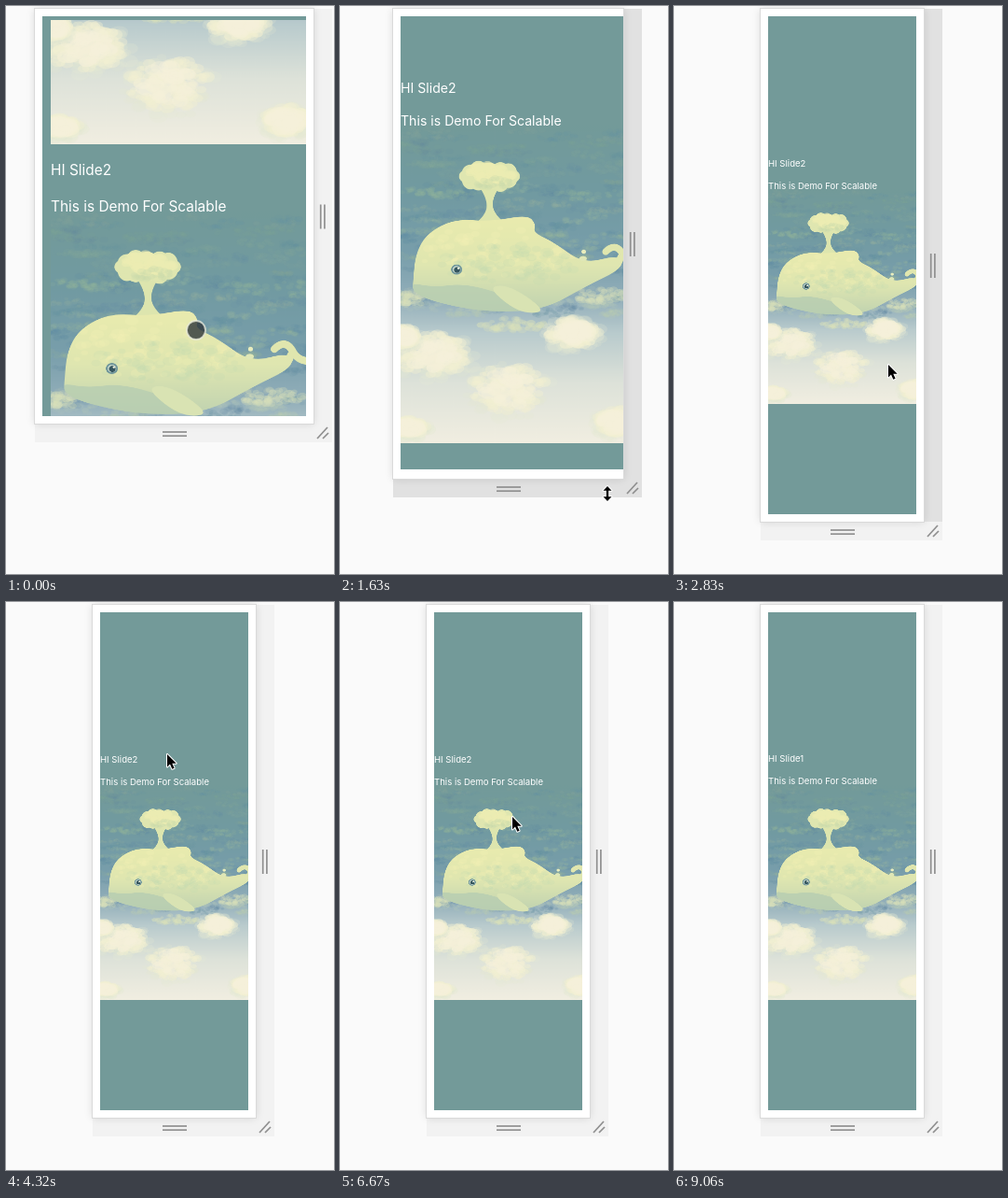
Write an HTML page with a canvas that moves like this. It is 352 px wide and 608 px high and loops after 9.81 s.

```html
<!DOCTYPE html>
<html lang="en">
<head>
<meta charset="utf-8">
<title>Scalable slides</title>
<style>
html, body { margin: 0; width: 100%; height: 100%; overflow: hidden; background: #fafafa; }
canvas { display: block; width: 352px; height: 608px; }
</style>
</head>
<body>
<canvas id="stage" width="352" height="608"></canvas>
<script>
const LOOP = 9810, TEAL = '#739a99', SLIDE_W = 173, SLIDE_H = 277;
const ctx = document.getElementById('stage').getContext('2d');

// The picture only changes in bursts: start, end, number of steps.
const bursts = [
  [140, 1040, 7], [1330, 2230, 7], [2380, 3120, 6], [3420, 4320, 7],
  [4620, 5640, 8], [5790, 6670, 7], [7420, 7870, 4], [8470, 9060, 5]
];
const ticks = [0];
for (const [from, to, n] of bursts)
  for (let i = 0; i < n; i++) ticks.push(Math.floor((from + (to - from) * i / (n - 1)) / 10) * 10);

const ramp = (t, from, to) => Math.min(1, Math.max(0, (t - from) / (to - from)));

// Moves are [from, to, change].
const total = (value, moves, t) => moves.reduce((v, [from, to, d]) => v + d * ramp(t, from, to), value);

const rightAt = t => total(330, [[1180, 1630, -26], [2230, 2670, -36]], t);
const bottomAt = t => total(447, [[1180, 1630, 59], [1630, 2230, 46]], t);

// Share of the slide height by which slide 2 is pulled down.
const pullAt = t => total(.3, [
  [0, 590, -.3], [3270, 3870, .3], [3870, 4170, -.3], [4470, 5200, .28],
  [5200, 5500, .72], [6080, 6520, -1], [7270, 7870, .42], [8320, 8910, .58]
], t);

// Pointer glides: from, to, x, y, look on the way
const glides = [
  [0, 290, 208, 270, 'touch'], [290, 1040, 333, 457, 'arrow'],
  [1180, 1630, 287, 522, 'vert'], [1630, 2230, 284, 559, 'vert'],
  [2230, 2670, 277, 300, 'horiz'], [2670, 2820, 229, 382, 'arrow'],
  [2820, 3120, 190, 250, 'arrow'], [3270, 3870, 182, 500, 'touch'],
  [3870, 4320, 172, 161, 'touch'], [4470, 5200, 176, 378, 'touch'],
  [5200, 5930, 181, 530, 'arrow'], [5930, 6370, 184, 14, 'touch'],
  [6370, 6670, 184, 228, 'arrow'], [7270, 7870, 186, 597, 'touch'],
  [8320, 8620, 186, 650, 'arrow']
];

function pointerAt(t) {
  let x = 204, y = 347, kind = 'arrow';
  for (const [from, to, tx, ty, look] of glides) {
    if (t < from) break;
    const k = ramp(t, from, to);
    x += (tx - x) * k;
    y += (ty - y) * k;
    kind = t < to ? look : 'arrow';
  }
  return { x, y, kind };
}

function seeded(seed) {
  return () => (seed = seed * 16807 % 2147483647) / 2147483647;
}

function paintSlide() {
  const Q = 3, pic = document.createElement('canvas');
  pic.width = SLIDE_W * Q;
  pic.height = SLIDE_H * Q;
  const g = pic.getContext('2d'), rnd = seeded(4711);
  g.scale(Q, Q);

  const fade = (y0, y1, stops) => {
    const grad = g.createLinearGradient(0, y0, 0, y1);
    for (const [p, c] of stops) grad.addColorStop(p, c);
    return grad;
  };
  const oval = (x, y, rx, ry, color, alpha = 1) => {
    g.globalAlpha = alpha;
    g.fillStyle = color;
    g.beginPath();
    g.ellipse(x, y, rx, ry, 0, 0, 7);
    g.fill();
    g.globalAlpha = 1;
  };
  const blob = (pts, fill) => {
    const mid = (a, b) => [(a[0] + b[0]) / 2, (a[1] + b[1]) / 2];
    g.beginPath();
    g.moveTo(...mid(pts[pts.length - 1], pts[0]));
    pts.forEach((p, i) => g.quadraticCurveTo(...p, ...mid(p, pts[(i + 1) % pts.length])));
    g.closePath();
    g.fillStyle = fill;
    g.fill();
  };
  // a heap of small ovals scattered over a w by h ellipse
  const puff = (x, y, w, h, color, alpha, n, size = h * .4) => {
    for (let i = 0; i < n; i++) {
      const a = rnd() * 6.283, d = Math.sqrt(rnd()), r = size * (.5 + rnd() * .6);
      oval(x + Math.cos(a) * d * w, y + Math.sin(a) * d * h, r * 1.5, r, color, alpha);
    }
  };

  g.fillStyle = fade(0, SLIDE_H, [
    [0, TEAL], [.16, TEAL], [.34, '#719aa1'], [.5, '#789eab'], [.62, '#93afba'],
    [.71, '#b9cbcd'], [.84, '#dde2d9'], [1, '#f1eee1']
  ]);
  g.fillRect(0, 0, SLIDE_W, SLIDE_H);

  // hazy layers of cloud behind the whale
  for (let i = 0; i < 150; i++) {
    const low = rnd(), y = 48 + low * 135, light = rnd() < .62;
    const color = !light ? '#648fa4' : low > .75 ? '#bccdb6' : low > .3 ? '#9dbb9f' : '#85a99b';
    puff(rnd() * SLIDE_W, y, 7 + rnd() * 13, 1.5 + rnd() * 2, color, .1 + low * .06, 20, 1.8);
  }
  for (const [x, y, w] of [[6, 171, 15], [148, 169, 22], [82, 190, 24]])
    puff(x, y, w, 5, '#dbe2bb', .28, 60, 2.4);

  // bright clouds below
  const clouds = [[24, 212, 28, 18], [1, 199, 12, 8], [126, 196, 20, 12], [79, 237, 30, 21],
    [158, 261, 16, 11], [6, 265, 14, 7]];
  for (const [x, y, w, h] of clouds) {
    puff(x, y + 2, w * 1.1, h, '#e4e7d0', .22, 70, 4);
    puff(x, y, w * .9, h * .85, '#f3f0d2', .4, 110, 3.4);
    puff(x, y, w * .6, h * .6, '#f6f1da', .4, 60, 4);
  }

  // spout
  blob([[54, 84], [76, 84], [67, 98], [68, 109], [82, 121], [50, 121], [63, 109], [63, 98]], '#dde5ae');
  for (let i = 0; i < 12; i++) {
    const a = i * Math.PI / 6;
    oval(65 + Math.cos(a) * 16, 82 + Math.sin(a) * 5, 6.3, 5 + i % 3, '#dfe6b0');
  }
  puff(65, 80, 17, 7, '#ecedb2', .55, 60, 3.4);
  puff(68, 87, 14, 4, '#c9d9ab', .3, 30, 2);

  // whale
  const skin = fade(112, 182, [[0, '#e9ebae'], [.5, '#dfe6b0'], [1, '#bfd2b0']]);
  g.strokeStyle = '#e0e6ae';
  g.lineWidth = 5;
  g.lineCap = 'round';
  g.stroke(new Path2D('M150 137Q157 130 162 138Q166 146 176 145M146 150Q158 152 161 141'));
  blob([
    [9, 160], [11, 138], [20, 123], [40, 113], [66, 115], [93, 110], [99, 117], [97, 123],
    [112, 130], [134, 146], [160, 139], [163, 149], [136, 162], [104, 180], [60, 181],
    [22, 173], [9, 166]
  ], skin);
  g.save();
  g.clip();
  puff(70, 136, 60, 20, '#f1efb2', .25, 70, 3);
  puff(80, 146, 50, 14, '#bfd4ae', .2, 70, 3);
  blob([[4, 159], [24, 163], [48, 160], [84, 171], [104, 176], [80, 186], [12, 184]], '#b7cdb2cc');
  g.restore();
  blob([[65, 163], [76, 161], [92, 169], [106, 181], [90, 182], [76, 174]], '#d9e3b3');

  // eye and drops
  oval(41, 150, 4, 3.7, '#6d949a');
  oval(41, 150, 2.9, 2.7, '#c2d4c9');
  oval(41.3, 150.3, 2.2, 2.1, '#35565f');
  oval(42.3, 149.2, .8, .7, '#eef2dd');
  oval(134, 137, 1.7, 1.5, '#e9edbd');
  oval(133.5, 142, 2.8, 1.8, '#dfe7b7');
  return pic;
}

const art = paintSlide();

function rect(x0, y0, x1, y1, color) {
  ctx.fillStyle = color;
  ctx.fillRect(x0, y0, x1 - x0, y1 - y0);
}

function clip(x0, y0, x1, y1) {
  ctx.beginPath();
  ctx.rect(x0, y0, x1 - x0, y1 - y0);
  ctx.clip();
}

function grip(x, y, dx, dy) {
  ctx.strokeStyle = '#8f8f8f';
  ctx.lineWidth = 1.7;
  ctx.beginPath();
  ctx.moveTo(x, y);
  ctx.lineTo(x + dx, y + dy);
  ctx.stroke();
}

function drawSlide(n, x, y, s) {
  ctx.save();
  ctx.translate(x, y);
  ctx.scale(s, s);
  ctx.drawImage(art, 0, 0, SLIDE_W, SLIDE_H);
  ctx.fillStyle = '#fff';
  ctx.font = '9.65px Inter, "Open Sans", sans-serif';
  ctx.fillText('HI Slide' + n, 0, 20.8);
  ctx.fillText('This is Demo For Scalable', 0, 44.9);
  ctx.restore();
}

function drawDevice(t) {
  const right = rightAt(t), left = 361 - right, bottom = bottomAt(t);
  const resizing = t >= 1330 && t < 2670;
  const wide = t >= 1330 && t < 2970, tall = t >= 1330 && t < 2300;
  const shade = on => on ? '#e1e1e1' : '#f2f2f2';
  rect(right, 3, right + 20, bottom, shade(wide));
  rect(left, bottom, right + 20, bottom + 20, shade(tall));

  ctx.save();
  ctx.shadowColor = 'rgba(0,0,0,.14)';
  ctx.shadowBlur = 9;
  rect(left, 3, right, bottom, '#fff');
  ctx.restore();
  ctx.strokeStyle = '#dadada';
  ctx.lineWidth = 1;
  ctx.strokeRect(left - .5, 2.5, right - left + 1, bottom - 2);

  const middle = (4 + bottom) / 2;
  for (const gap of [0, 4.2]) {
    grip(right + 7.7 + gap, middle - 13, 0, 26);
    grip(168, bottom + 9 + gap, 26, 0);
  }
  grip(right + 4, bottom + 16, 11, -12);
  grip(right + 10, bottom + 16, 6, -6);

  // the page lags behind its frame during a resize
  const x = left + 8, pageRight = right - (resizing ? 0 : 8), end = bottom - (resizing ? 10 : 8);
  rect(x, 11, pageRight, end, TEAL);
  const s = Math.min((right - left - 24) / 152, (bottom - 19) / 267.5), h = SLIDE_H * s;
  const slideX = x + Math.max(0, Math.round((pageRight - x - 165.6 * s) / 2));
  const top = Math.floor((11 + end - h) / 2 + 11.7), y = Math.round(top + pullAt(t) * h);
  ctx.save();
  clip(x, 11, pageRight, end);
  clip(slideX, top, pageRight, top + h);
  if (y > top) drawSlide(1, slideX, y - h, s);
  drawSlide(2, slideX, y, s);
  if (y === top && s === 1) rect(slideX, top, pageRight, top + 1, 'rgba(243,239,223,.5)');
  ctx.restore();
}

function shape(points, width) {
  ctx.beginPath();
  for (const p of points) ctx.lineTo(...p);
  ctx.closePath();
  ctx.lineJoin = 'round';
  ctx.strokeStyle = '#fff';
  ctx.lineWidth = width;
  ctx.stroke();
  ctx.fillStyle = '#000';
  ctx.fill();
}

const ARROW = [[1, 2], [1, 15.5], [4, 12.6], [6.3, 17.8], [8.6, 16.8], [6.3, 11.7], [10.7, 11.7]];
const HEAD = [[1.2, 3.2], [4.5, 3.2], [0, 8], [-4.5, 3.2], [-1.2, 3.2]];
const DOUBLE = [...HEAD, ...HEAD.map(([x, y]) => [-x, -y])];

function drawPointer({ x, y, kind }) {
  ctx.save();
  ctx.translate(x, y);
  if (kind === 'touch') {
    ctx.beginPath();
    ctx.arc(0, 0, 10, 0, 7);
    ctx.fillStyle = 'rgba(45,52,58,.8)';
    ctx.fill();
    ctx.strokeStyle = 'rgba(235,236,222,.75)';
    ctx.lineWidth = 1.8;
    ctx.stroke();
  } else if (kind === 'arrow') {
    shape(ARROW, 2);
  } else {
    if (kind === 'horiz') ctx.rotate(Math.PI / 2);
    shape(DOUBLE, 2);
  }
  ctx.restore();
}

function draw(t) {
  const tick = ticks.filter(v => v <= t).pop();
  rect(0, 0, 352, 608, '#fafafa');
  drawDevice(tick);
  drawPointer(pointerAt(tick));
}

let start;
function loop(now) {
  start ??= now;
  draw((now - start) % LOOP);
  requestAnimationFrame(loop);
}
draw(0);
requestAnimationFrame(loop);
</script>
</body>
</html>
```
